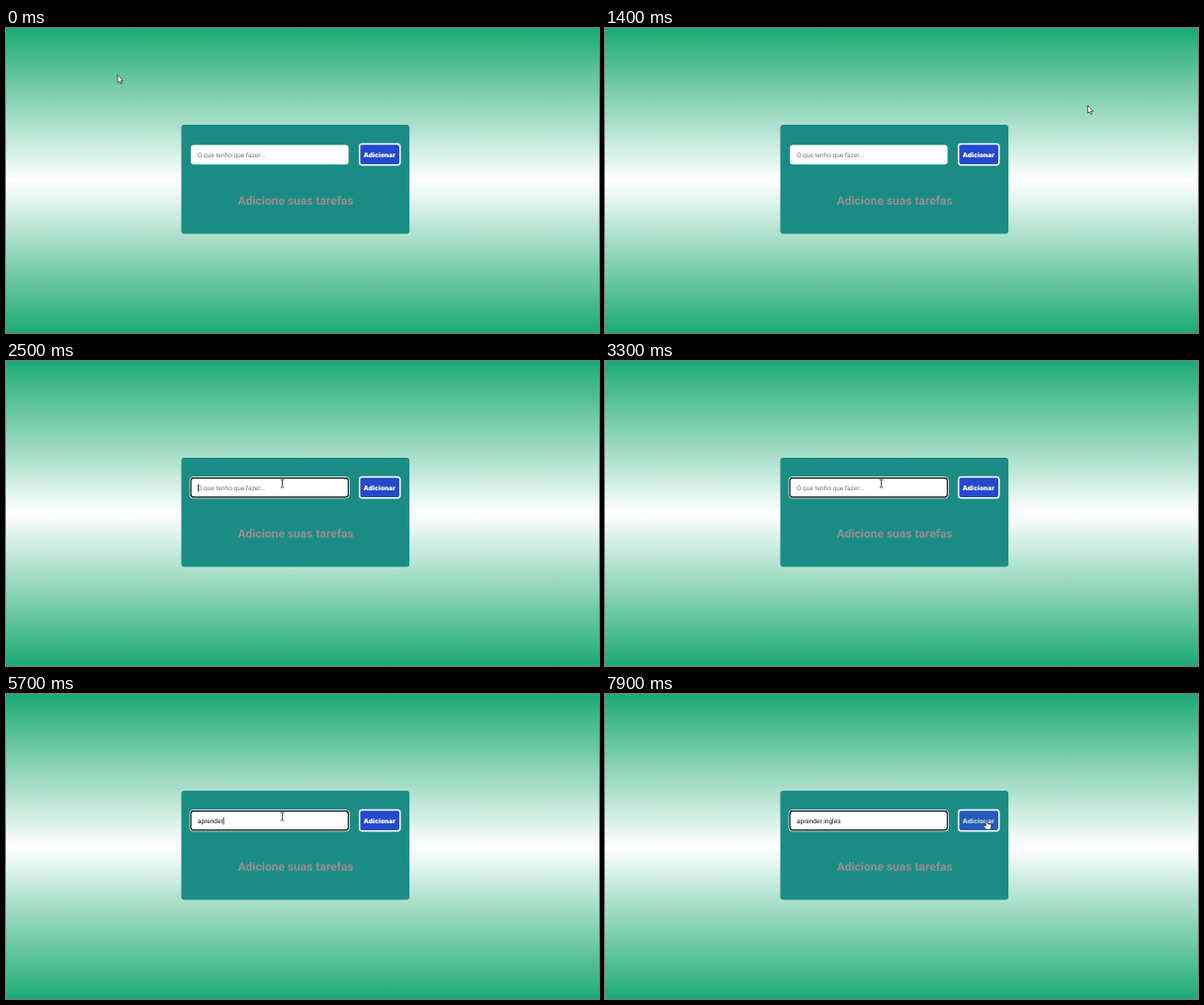
Animation of 600x309 px, one loop 8000 ms. Source, as an HTML page:

```html
<!DOCTYPE html>
<html lang="pt">
<head>
<meta charset="utf-8">
<style>
html, body { margin: 0; height: 100%; overflow: hidden; }
svg { display: block; width: 600px; height: 309px; }
text { font-family: Roboto, sans-serif; text-rendering: geometricPrecision; }
</style>
</head>
<body>
<svg viewBox="0 0 600 309">
  <defs>
    <linearGradient id="bg" x2="0" y2="1">
      <stop offset="0" stop-color="#1caa74"/>
      <stop offset=".5" stop-color="#fff"/>
      <stop offset="1" stop-color="#1caa74"/>
    </linearGradient>
  </defs>
  <rect width="600" height="309" fill="url(#bg)"/>
  <rect x="177.4" y="98" width="230.8" height="110.6" rx="3" fill="#1b8c84"/>
  <rect x="187" y="118.4" width="159.6" height="19.8" rx="3" fill="#fff"/>
  <g id="focus" fill="none">
    <rect x="186.1" y="117.6" width="161.2" height="21.3" rx="3.2" stroke="#fff" stroke-width=".9"/>
    <rect x="187.1" y="118.6" width="159.2" height="19.3" rx="2.6" stroke="#101010" stroke-width="1.1"/>
  </g>
  <text id="field" x="194" y="130.7" font-size="6.5"></text>
  <rect id="caret" y="125" width=".8" height="7.4" fill="#111"/>
  <rect id="button" x="357.7" y="117.4" width="41" height="21.3" rx="2.6" stroke="#fff" stroke-width="1.5"/>
  <text id="label" x="378" y="130.7" font-size="6.6" font-weight="900" text-anchor="middle" style="font-family:Inter,sans-serif">Adicionar</text>
  <text x="293" y="179.2" font-size="12" font-weight="700" text-anchor="middle" fill="#958e93">Adicione suas tarefas</text>
  <g id="pointer">
    <path id="arrow" d="M0 0V8L1.8 6.4L3 9.1L4.3 8.5L3.1 5.9H5.5Z" fill="#fff" stroke="#222" stroke-width=".7"/>
    <path id="beam" d="M-1.8 -3.8H-.5L0 -3.4L.5 -3.8H1.8M0 -3.4V3.7M-1.8 4.1H-.5L0 3.7L.5 4.1H1.8" fill="none" stroke="#222" stroke-width=".8"/>
    <path id="hand" d="M-.8 .4Q0 -.7 .8 .4V3.6L4.2 4.5Q5 4.8 4.9 6L4.2 10H-.3L-3 6.2Q-2.7 5-1.8 5.6L-.8 6.5Z" fill="#fff" stroke="#222" stroke-width=".7"/>
  </g>
</svg>
<script>
const el = id => document.getElementById(id);
const show = (id, on) => el(id).setAttribute("visibility", on ? "visible" : "hidden");
const LOOP = 8000, STEP = 100, FOCUS = 2500;
const TASK = "aprender ingles", HINT = "O que tenho que fazer...";

// time, x, y of the pointer
const path = [
  [0, 113, 47.5], [700, 227, 51.5], [900, 300, 53], [1300, 521, 74],
  [1800, 358, 96], [1900, 341, 98.5], [2300, 279.6, 124], [7500, 279.6, 124],
  [7600, 301, 123], [7700, 345, 122], [7800, 375, 125], [7900, 386, 127.5]
];
const keyTime = i => i < 8 ? 4700 + i * 135 : 5900 + (i - 8) * 200;

function pointerAt(t) {
  const i = path.findIndex(p => p[0] > t);
  if (i < 0) return path.at(-1).slice(1);
  const [t0, x0, y0] = path[i - 1], [t1, x1, y1] = path[i];
  const k = (t - t0) / (t1 - t0);
  return [x0 + (x1 - x0) * k, y0 + (y1 - y0) * k];
}

function mix(a, b, k) {
  return `rgb(${a.map((v, i) => Math.round(v + (b[i] - v) * k))})`;
}

function draw(t) {
  const [x, y] = pointerAt(t);
  const inside = (l, r) => x > l && x < r && y > 118 && y < 139;
  const overField = inside(187, 347), overButton = inside(357, 399);
  show("beam", overField);
  show("hand", overButton);
  show("arrow", !overField && !overButton);
  el("pointer").setAttribute("transform", `translate(${x} ${y})`);

  let typed = 0;
  while (typed < TASK.length && keyTime(typed) <= t) typed++;
  const field = el("field");
  field.textContent = typed ? TASK.slice(0, typed) : HINT;
  field.setAttribute("fill", typed ? "#111" : "#757575");

  // The caret restarts its blink with each key
  const since = t - (typed ? keyTime(typed - 1) : FOCUS);
  show("focus", t >= FOCUS);
  show("caret", t >= FOCUS && since % 1000 < 500);
  el("caret").setAttribute("x", 194 + (typed ? field.getSubStringLength(0, typed) : 0));

  const hover = overButton ? (t - 7700) / 200 : 0;
  el("button").setAttribute("fill", mix([37, 73, 204], [34, 91, 188], hover));
  el("label").setAttribute("fill", mix([255, 255, 255], [188, 211, 208], hover));
}

function frame(now) {
  draw(Math.floor(now % LOOP / STEP) * STEP);
  requestAnimationFrame(frame);
}
draw(0);
requestAnimationFrame(frame);
</script>
</body>
</html>
```
